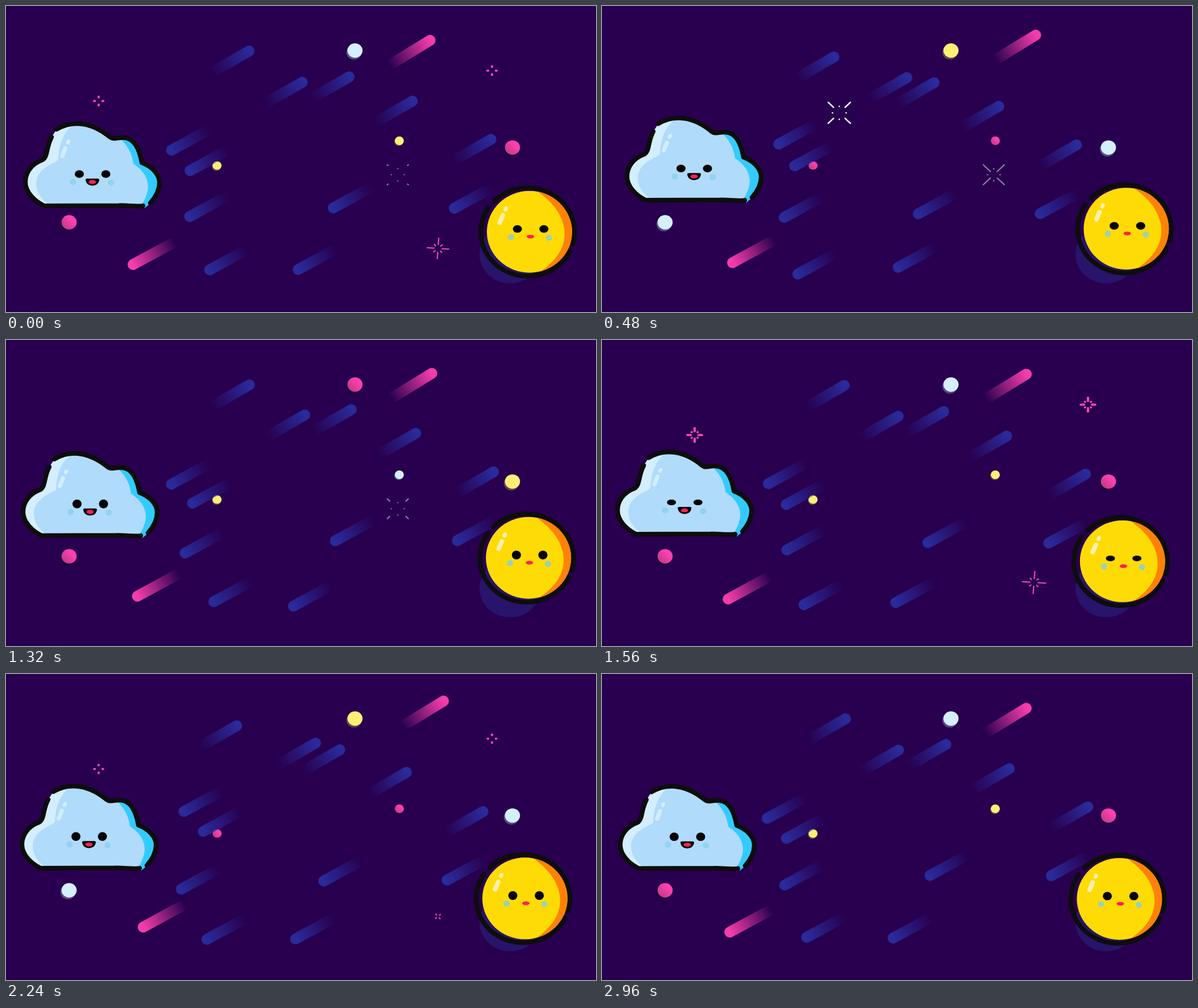
Recreate the animation shown at these times as an HTML page with a canvas. Size 1038 by 539 pixels, loop 3 s.

```html
<!DOCTYPE html>
<html lang="en">
<head>
<meta charset="utf-8">
<title>Cloud and sun</title>
<style>
html, body { margin: 0; width: 100%; height: 100%; overflow: hidden; background: #28004f; }
canvas { display: block; }
</style>
</head>
<body>
<canvas width="1038" height="539"></canvas>
<script>
const ctx = document.querySelector('canvas').getContext('2d');
const LOOP = 3, TAU = Math.PI * 2, RAD = Math.PI / 180, INK = '#0d0d0d';

const smooth = v => { v = Math.min(1, Math.max(0, v)); return v * v * (3 - 2 * v); };

function ellipse(x, y, rx, ry, color) {
  ctx.fillStyle = color;
  ctx.beginPath();
  ctx.ellipse(x, y, rx, ry, 0, 0, TAU);
  ctx.fill();
}

function line(x1, y1, x2, y2, width, color) {
  ctx.strokeStyle = color;
  ctx.lineWidth = width;
  ctx.beginPath();
  ctx.moveTo(x1, y1);
  ctx.lineTo(x2 + 0.01, y2);
  ctx.stroke();
}

function fillPath(path, color) {
  ctx.fillStyle = color;
  ctx.fill(path);
}

// Smooth drift through [time, dx, dy] keys
function drift(keys, t) {
  let i = 0;
  while (i < keys.length - 2 && t > keys[i + 1][0]) i++;
  const a = keys[i], b = keys[i + 1];
  const before = keys[i - 1] || a, after = keys[i + 2] || b;
  const span = b[0] - a[0], u = Math.min(1, (t - a[0]) / span), u2 = u * u, u3 = u2 * u;
  return [1, 2].map(k => {
    const ma = (b[k] - before[k]) / (b[0] - before[0]) * span;
    const mb = (after[k] - a[k]) / (after[0] - a[0]) * span;
    return (2 * u3 - 3 * u2 + 1) * a[k] + (u3 - 2 * u2 + u) * ma
      + (3 * u2 - 2 * u3) * b[k] + (u3 - u2) * mb;
  });
}

const CLOUD_KEYS = [[0, 0, 0], [.48, 10, -9.8], [.84, 5.7, -7.6], [1.32, -4, -7.3],
  [1.8, -8, -12.2], [2.24, -6, -9.8], [2.96, -2, -9.3]];
const SUN_KEYS = [[0, 0, 0], [.48, 1.4, -5.5], [.84, 2, -10], [1.32, -1.7, -14],
  [1.8, -8.2, -1.4], [2.24, -8, -2.4], [2.96, -10.6, -1.5]];

// Meteors: middle x, y, phase in degrees, heading (1 up-right, -1 down-left), pink
const METEORS = [
  [417, 85, -24, 1], [533, 128, 188, 1], [595.7, 129, -47, 1], [710, 170.3, -65, 1],
  [846.5, 238.5, -55, 1], [758, 54, 180, 1, true],
  [302, 248, 157, -1], [335.5, 283.5, 188, -1], [315.5, 375, 50, -1],
  [232.5, 450.5, 220, -1, true], [356, 466, -79, -1], [511.5, 465.5, 78, -1],
  [567.5, 360, -46, -1], [782.5, 359.5, -58, -1]
];

function meteor([cx, cy, phase, dir, pink], t) {
  const slide = 11.8 * Math.cos(TAU * t / 1.5 - phase * RAD);
  const angle = (dir > 0 ? (pink ? 31.5 : 30) : 28.5) * RAD;
  const length = pink ? 84 : 76;
  const color = pink ? '#f53cab' : '#2a2a9a';
  ctx.save();
  ctx.translate(cx + slide, cy - slide * .54);
  ctx.rotate(-angle);
  ctx.scale(dir, 1);
  const fade = ctx.createLinearGradient(0, 0, -length, 0);
  fade.addColorStop(0, color);
  fade.addColorStop(1, color + '00');
  line(-length, 0, 0, 0, 19, fade);
  ctx.restore();
}

const DOT_COLORS = ['#d5efff', '#ffee76', '#ff40b0'];
const DOT_SHADOWS = ['#564a80', '#5b4050', '#1b003d'];
// Dots: x, y, radius, first colour, time of first change
const DOTS = [[614, 78.5, 13.3, 0, .335], [891, 249.3, 13.3, 2, .335], [692, 237.3, 8, 1, .335],
  [371.3, 281, 8, 1, .31], [111, 381, 13.3, 2, .31]];

function dot([x, y, r, first, change], t) {
  const k = (first + Math.floor((t + .5 - change) / .5)) % 3;
  const ry = r * .95;
  ellipse(x - r * .14, y + r * .24, r, ry, DOT_SHADOWS[k]);
  let color = DOT_COLORS[k];
  if (k === 2) {
    color = ctx.createLinearGradient(x + r * .4, y - r * .4, x - r * .8, y + r * .8);
    color.addColorStop(0, DOT_COLORS[2]);
    color.addColorStop(1, '#bd3a84');
  }
  ellipse(x, y, r, ry, color);
}

const PINK = '#ff48b6';
const PAIR_STARTS = [-.03, .72, 1.47, 2.22];
const SPARKS = [
  { x: 163, y: 167.3, size: 1, turn: 0, width: 4, color: PINK, dur: .37, starts: PAIR_STARTS },
  { x: 855, y: 113.8, size: 1, turn: 0, width: 4, color: PINK, dur: .37, starts: PAIR_STARTS },
  { x: 417.5, y: 188.2, size: .59, turn: 0, width: 2.5, color: '#fff', dur: .5, starts: [.07, .82, 1.57, 2.32] },
  { x: 689.3, y: 297.3, size: .56, turn: 0, width: 2.2, color: '#9080a8', dur: .5, starts: [-.49, .17, .855] },
  { x: 760, y: 427, size: .5, turn: 49, width: 2.1, color: PINK, dur: .5, starts: [-.24, .55, 1.305, 2.14] }
];

function spark(s, t) {
  const start = s.starts.find(v => t >= v && t < v + s.dur);
  if (start === undefined) return;
  const u = (t - start) / s.dur;
  if (u < .04) return;
  const shortOut = 7.2 + 13.3 * smooth(u / .55);
  const shortIn = Math.min(shortOut, 6.8 + 13.4 * smooth((u - .3) / .4));
  const longOut = 33 * smooth((u - .12) / .5);
  const longIn = Math.min(longOut, 10 + 23 * Math.max(0, (u - .45) / .55) ** 3);
  ctx.save();
  ctx.translate(s.x, s.y);
  ctx.scale(1, .95);
  ctx.rotate(s.turn * RAD);
  const ray = (a, b) => line(a * s.size, 0, b * s.size, 0, s.width, s.color);
  for (let i = 0; i < 4; i++) {
    ray(shortIn, shortOut);
    ctx.rotate(TAU / 8);
    if (u > .22) ray(longIn * Math.SQRT2, longOut * Math.SQRT2);
    ctx.rotate(TAU / 8);
  }
  ctx.restore();
}

function eyes(x, y, t) {
  const p = (t + .75) % 1.5 - .75;
  const open = .15 + .85 * smooth(Math.abs(p - .24) / .32);
  ellipse(x, y, 8, 7.7 * open, '#050505');
  ellipse(x + 46.6, y, 8, 7.7 * open, '#050505');
}

function cheeks(x, y, color) {
  ellipse(x, y, 5.6, 5.4, color);
  ellipse(x + 66.8, y + 1.3, 5.6, 5.4, color);
}

function outline(path) {
  ctx.strokeStyle = INK;
  ctx.lineWidth = 8.2;
  ctx.stroke(path);
}

const TOP = 'M89 217C118 200 152 205 183 231C190 236 195 231 208 232C223 233 234 248 239 276C257 283 270 296 270 311C270 325 262 338 254 347';
const BASE = '241 352C228 354 215 351 198 351.5L67 352C50 344 34 328 34 310C34 293 45 278 64 271C74 265 70 250 80 231';
const cloudBody = new Path2D(TOP + 'L244 356L' + BASE + 'Z');
const cloudLine = new Path2D(TOP + 'M' + BASE);
const cloudMain = new Path2D('M128 204C101 216 93 245 92 271C88 276 53 285 53 313C53 328 62 341 78 352H260V200Z');
const cloudShade = new Path2D('M196 230C213 242 222 260 224 278C240 288 250 302 250 319C249 334 242 345 234 358H290V230Z');
const grin = new Path2D('M143 304H161Q164 304 164 306C163 320 141 320 140 306Q140 304 143 304Z');

function cloud(t) {
  ctx.save();
  ctx.translate(...drift(CLOUD_KEYS, t));
  ctx.save();
  ctx.clip(cloudBody);
  fillPath(cloudBody, '#d3eefe');
  fillPath(cloudMain, '#b0dbfb');
  fillPath(cloudShade, '#33cbff');
  ctx.restore();
  outline(cloudLine);
  line(98.8, 264.5, 104.3, 250.5, 7, '#d3eefe');
  line(109, 240.5, 110, 238.5, 6.5, '#d3eefe');
  cheeks(118, 310, '#93d3ee');
  eyes(129, 296, t);
  fillPath(grin, '#050505');
  ellipse(152, 310, 6.5, 3.5, '#ff1f55');
  ctx.restore();
}

const sunBody = new Path2D();
sunBody.ellipse(921, 397.7, 75, 72, 0, 0, TAU);
const sunShade = new Path2D('M930 320L934 326C998 370 998 430 940 468L936 480H1010V320Z');
const sunLine = new Path2D();
sunLine.ellipse(917.7, 398, 82.6, 77.8, 0, 225 * RAD, 376.4 * RAD);
sunLine.moveTo(991.9, 432);
sunLine.ellipse(917.7, 398, 82.6, 77.8, 0, 26 * RAD, 213.5 * RAD);

function sun(t) {
  ellipse(887, 437.5, 54, 51, '#28146a');
  ctx.save();
  ctx.translate(...drift(SUN_KEYS, t));
  fillPath(sunBody, '#ffdb05');
  ctx.save();
  ctx.clip(sunBody);
  fillPath(sunShade, '#ff8206');
  ctx.restore();
  outline(sunLine);
  line(868.5, 381.5, 874, 368.7, 8, '#fff0b0');
  line(878.8, 358.5, 879.6, 356.5, 7, '#fff0b0');
  cheeks(888.5, 406.8, '#9dd2b4');
  eyes(899.7, 392.7, t);
  ellipse(922.6, 406.2, 6.5, 3.3, '#ff1f55');
  ctx.restore();
}

function draw(now) {
  const t = now / 1000 % LOOP;
  ctx.fillStyle = '#28004f';
  ctx.fillRect(0, 0, 1038, 539);
  ctx.lineCap = ctx.lineJoin = 'round';
  DOTS.forEach(d => dot(d, t));
  METEORS.forEach(m => meteor(m, t));
  SPARKS.forEach(s => spark(s, t));
  cloud(t);
  sun(t);
}

const begin = performance.now();
function tick() {
  draw(performance.now() - begin);
  requestAnimationFrame(tick);
}
tick();
</script>
</body>
</html>
```
